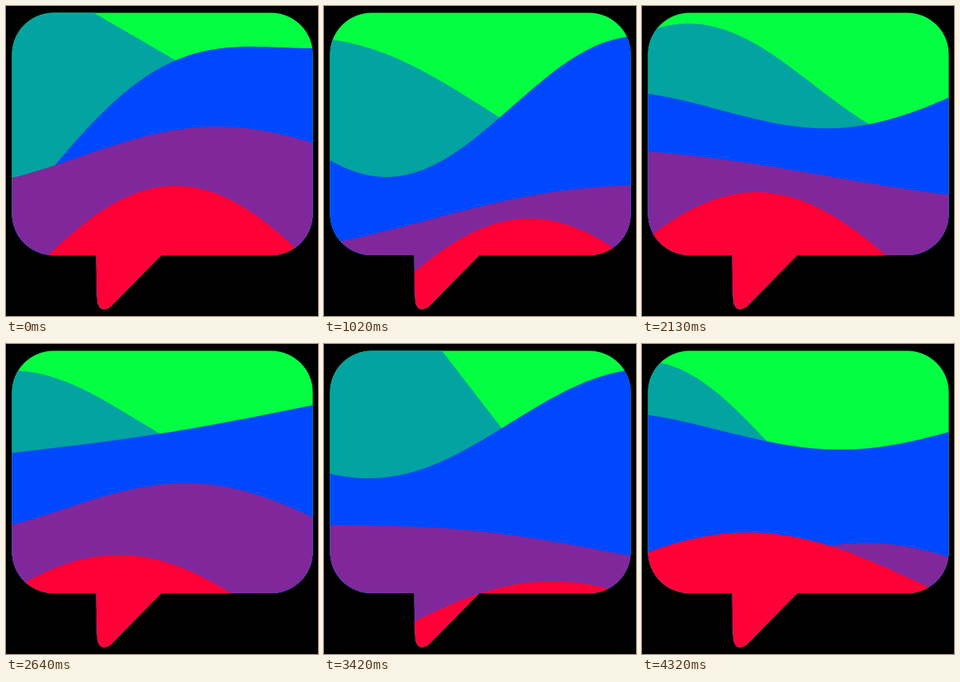
Recreate the animation shown at these times as an HTML page. Size 390x388 px, loop 4350 ms.

```html
<!DOCTYPE html>
<html lang="en">
<head>
<meta charset="utf-8">
<title>Waves in a speech bubble</title>
<style>
  html, body { margin: 0; width: 100%; height: 100%; overflow: hidden; background: #000; }
  svg { display: block; width: 100%; height: 100%; }
</style>
</head>
<body>
<svg viewBox="0 0 390 388">
  <clipPath id="bubble">
    <path d="M59.5 8.5H331.5A52 52 0 0 1 383.5 60.5V260A52 52 0 0 1 331.5 312H194L134 373Q128 380 122 379.5Q115 379 114 368Q113 350 112.8 312H59.5A52 52 0 0 1 7.5 260V60.5A52 52 0 0 1 59.5 8.5Z"/>
  </clipPath>
  <g id="waves" clip-path="url(#bubble)">
    <rect width="390" height="388" fill="#04ff42"/>
  </g>
</svg>
<script>
const LOOP = 4350, STEP = 30;
const WIDTH = 390, BOTTOM = 400, DX = 5;
const TIMES = [0, 1020, 1440, 2130, 2640, 3420, 4320];
const group = document.getElementById('waves');

// A swell is a cosine around (x, y): positive depth is a hill, negative a valley.
const swell = (x, y, depth, tilt = 0) => reach => at =>
  y + tilt * (at - x) + depth * (1 - Math.cos((at - x) / reach));

function wave(color, reach, ...swells) {
  const path = document.createElementNS('http://www.w3.org/2000/svg', 'path');
  path.setAttribute('fill', color);
  group.append(path);
  return { path, shapes: swells.map(shape => shape(reach)) };
}

const waves = [
  wave('#02a3a1', 100,
    swell(200, 61, 0, 0.58), swell(40, 48, 38, 0.25), swell(335, 156, -50, 0.24),
    swell(58, 22, 77), swell(5, 33, 61), swell(184, 56, 0, 1.3), swell(5, 22, 106)),
  wave('#0048ff', 100,
    swell(185, 82, 64, -0.6), swell(78, 214, -88), swell(235, 185, -51, -0.05),
    swell(255, 152, -36, -0.09), swell(200, 111, -4, -0.16), swell(75, 167, -52, -0.1),
    swell(255, 132, -27, -0.02)),
  wave('#80279b', 110,
    swell(264, 151, 38), swell(300, 231, 15, -0.13), swell(278, 186, 62),
    swell(60, 187, 7, 0.11), swell(246, 175, 45, 0.08), swell(190, 234, 10, 0.1),
    swell(280, 249, 43)),
  wave('#ff0037', 140,
    swell(212, 225, 150), swell(257, 266, 138), swell(45, 234, 68),
    swell(143, 233, 132), swell(141, 264, 104), swell(285, 297, 76), swell(133, 236, 66))
];

// Cubic Hermite weights of the four swells around time t.
function blendAt(t) {
  const last = TIMES.length - 1;
  let i = 0;
  while (i < last - 1 && t >= TIMES[i + 1]) i++;
  const before = Math.max(i - 1, 0), after = Math.min(i + 2, last);
  const span = TIMES[i + 1] - TIMES[i], u = (t - TIMES[i]) / span;
  const ease = u * u * (3 - 2 * u);
  const leave = u * (1 - u) ** 2 * span / (TIMES[i + 1] - TIMES[before]);
  const arrive = u * u * (1 - u) * span / (TIMES[after] - TIMES[i]);
  return [
    [before, -leave],
    [i, 1 - ease + arrive],
    [i + 1, ease + leave],
    [after, -arrive]
  ];
}

function outline(shapes, blend) {
  let d = `M0 ${BOTTOM}`;
  for (let x = 0; x <= WIDTH; x += DX) {
    const y = blend.reduce((sum, [i, weight]) => sum + weight * shapes[i](x), 0);
    d += `L${x} ${y.toFixed(2)}`;
  }
  return `${d}V${BOTTOM}Z`;
}

function draw(now) {
  const blend = blendAt(Math.floor((now % LOOP) / STEP) * STEP);
  for (const { path, shapes } of waves) path.setAttribute('d', outline(shapes, blend));
}

const start = performance.now();
function tick() {
  draw(performance.now() - start);
  requestAnimationFrame(tick);
}
tick();
</script>
</body>
</html>
```
